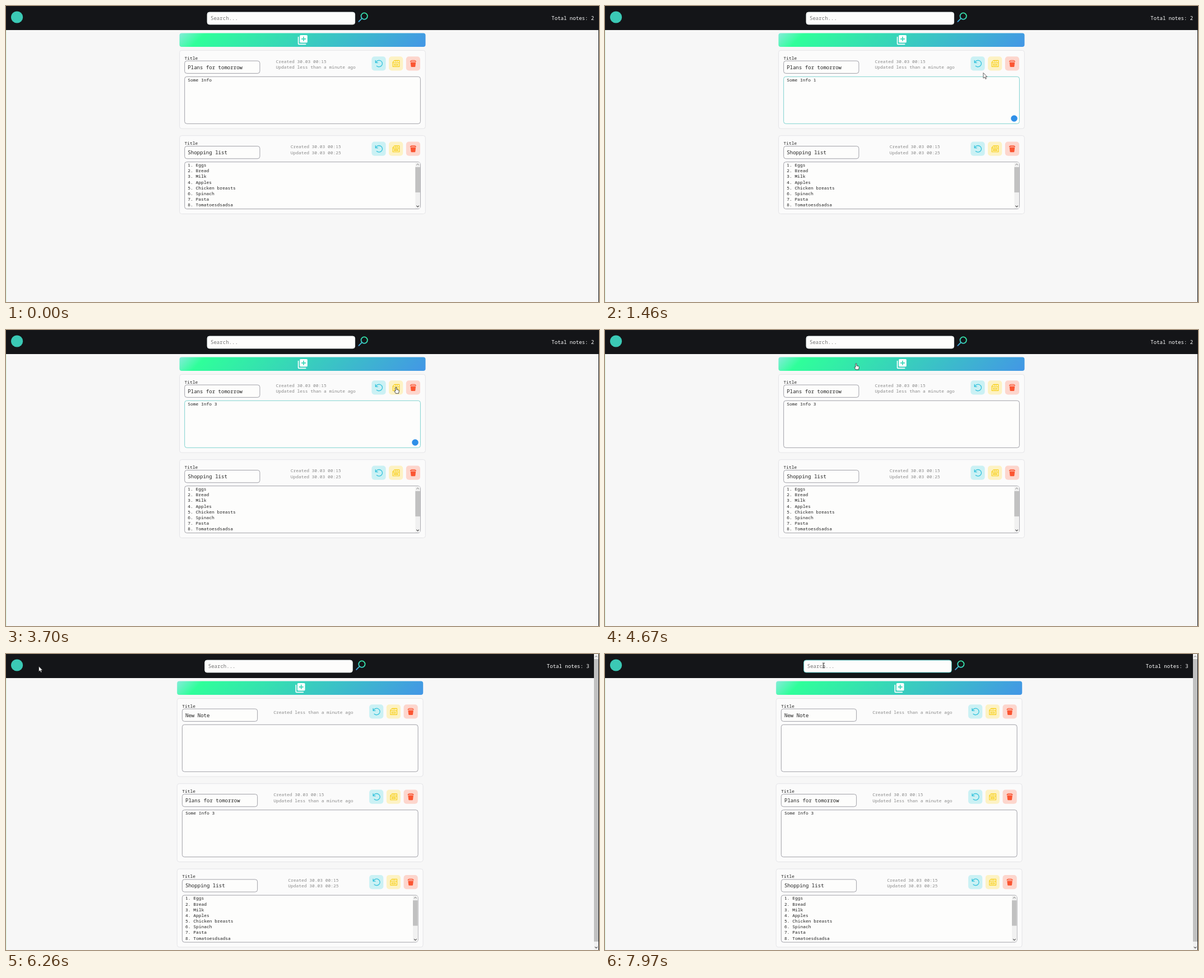
Write an HTML page that moves like this. It is 1058x529 px and loops after 8 s.

```html
<!DOCTYPE html>
<html lang="en">
<head>
<meta charset="utf-8">
<title>Notes</title>
<style>
html, body { margin: 0; width: 100%; height: 100%; overflow: hidden; background: #f7f7f7; }
svg { display: block; width: 1058px; height: 529px; }
text { font: 7.92px "Noto Sans Mono", "DejaVu Sans Mono", monospace; fill: #222; white-space: pre; }
.big { font-size: 9.06px; }
.meta { fill: #8b8b8b; }
.hint { fill: #757575; }
.field { fill: #fdfdfc; stroke: #92929a; stroke-width: .85; }
.focus { stroke: #6accc8; }
.search { stroke: #eef6f5; }
.search.focus { stroke: #45c9c6; }
.line { fill: none; stroke-linecap: round; stroke-linejoin: round; }
</style>
</head>
<body>
<svg id="stage" viewBox="0 0 1058 529">
  <defs>
    <linearGradient id="bar" gradientUnits="userSpaceOnUse" x1="413" y1="-55" x2="645" y2="177">
      <stop offset="0" stop-color="#84ecd9"/><stop offset=".1" stop-color="#2fff9a"/><stop offset="1" stop-color="#4396e6"/>
    </linearGradient>
    <linearGradient id="lens" gradientUnits="userSpaceOnUse" x1="644" y1="12" x2="629" y2="28">
      <stop offset="0" stop-color="#35f0a4"/><stop offset=".5" stop-color="#38d6bd"/><stop offset="1" stop-color="#4299e4"/>
    </linearGradient>
    <g id="tools">
      <rect x="652.4" y="90.2" width="25.2" height="25.2" rx="5" fill="#cbf1f4"/>
      <path class="line" d="M659.3 97.3v4h4M659.8 101a6 5.8 0 1 1 1.6 6.2" stroke="#35c3dc" stroke-width="1.3"/>
      <rect x="683.1" y="90.2" width="25.2" height="25.2" rx="5" fill="#fdf2c4"/>
      <path class="line" d="M690.2 100.4l3-3h8.6v10.9h-11.6zM690.4 101.5h11.2M692.8 104h6.2v2h-6.2zM695 97.6v2M698 97.6v2" stroke="#f8cf16" stroke-width="1.15"/>
      <rect x="713.8" y="90.2" width="25.2" height="25.2" rx="5" fill="#fdd6cd"/>
      <path d="M721.7 100.7h9.4l-.8 7.2q-.1 1-1.1 1h-5.6q-1 0-1.1-1z" fill="#fb5532"/>
      <path class="line" d="M721.4 99.2q.8-1.7 2.6-2h4.8q1.8.3 2.6 2z" stroke="#fb5532" stroke-width="1.1"/>
    </g>
    <g id="arrow"><path d="M0 0V9.6L2.3 7.5 3.9 11 5.4 10.3 3.9 7H6.8Z" fill="#fff" stroke="#222" stroke-width=".7"/></g>
    <g id="beam"><path class="line" d="M-1.8-4.2H1.8M0-4.2V4.2M-1.8 4.2H1.8" stroke="#333" stroke-width=".9"/></g>
    <g id="hand"><path d="M-1 .8Q0-.6 1 .8V4.5L4.4 5.2Q5.4 5.6 5.3 7L4.6 11.3H-.7L-3.1 7.2Q-2.8 5.8-1 7.2Z" fill="#fff" stroke="#222" stroke-width=".8"/></g>
  </defs>
  <rect width="1058" height="529" fill="#f7f7f7"/>
  <rect y="43" width="1" height="486" fill="#d9f6df"/>
  <rect width="1058" height="43" fill="#141518"/>
  <circle cx="19.6" cy="20" r="10.6" fill="#3bc9b5"/>
  <g id="before"></g>
  <g id="after"></g>
  <rect x="1057" width="1" height="529" fill="#141518"/>
  <path id="caret" d="M0 0V10" stroke="#111" stroke-width=".9"/>
  <use id="cursor"/>
</svg>
<script>
const $ = id => document.getElementById(id);
const text = (x, y, s, cls = '', more = '') => `<text x="${x}" y="${y}" class="${cls}" ${more}>${s}</text>`;
const box = (x, y, w, h, cls = '') => `<rect x="${x}" y="${y}" width="${w}" height="${h}" rx="4" class="field ${cls}"/>`;
const bare = (x, y, w, h, fill) => `<rect x="${x}" y="${y}" width="${w}" height="${h}" fill="${fill}"/>`;
const chevron = (x, y, dir, color) =>
  `<path class="line" d="M${x - 2} ${y + dir}l2 ${-2 * dir}l2 ${2 * dir}" stroke="${color}" stroke-width="1.1"/>`;

const PITCH = 152.4, SHIFT = -4.3;
const recent = 'less than a minute ago';
const shopping = {
  title: 'Shopping list', meta: ['Created 30.03 00:15', 'Updated 30.03 00:25'], scroll: true,
  body: ['Eggs', 'Bread', 'Milk', 'Apples', 'Chicken breasts', 'Spinach', 'Pasta', 'Tomatoesdsadsa'].map((s, i) => `${i + 1}. ${s}`)
};
const plans = { title: 'Plans for tomorrow', meta: ['Created 30.03 00:15', 'Updated ' + recent], body: ['Some Info 3'] };
const fresh = { title: 'New Note', meta: ['Created ' + recent], body: [] };

function card({ title, meta, body, scroll }, i) {
  const width = Math.max(...meta.map(s => s.length)) * 4.75;
  const metaY = meta.length > 1 ? 102 : 107;
  return `<g transform="translate(0 ${i * PITCH})">
    <rect x="309.6" y="79.3" width="438.8" height="139.8" rx="4" fill="#fbfbfb" stroke="#e3e3e6" stroke-width=".9"/>
    ${text(318.5, 95.6, 'Title')}${box(318.7, 98.1, 134.2, 22.3)}${text(324.3, 112.7, title, 'big')}
    ${meta.map((s, k) => text(552.8 - width / 2, metaY + k * 10.15, s, 'meta')).join('')}
    <use href="#tools"/>
    ${box(318.7, 126.3, 420.7, 84)}
    ${body.map((s, k) => text(324.3, 134.7 + k * 10.16, s)).join('')}
    ${scroll ? bare(730.3, 127, 8.6, 82.6, '#f1f1f1') + bare(730.3, 135.5, 8.6, 45.3, '#c1c1c1')
      + chevron(734.6, 130.7, 1, '#a3a3a3') + chevron(734.6, 205.8, -1, '#505050') : ''}
  </g>`;
}

const page = notes => `
  ${box(359, 11, 263.6, 22, 'search')}${text(365, 24.8, 'Search...', 'big hint')}
  <g class="line" stroke="url(#lens)"><circle cx="639.2" cy="18.1" r="5.7" stroke-width="1.8"/><path d="M634.9 22.4L629.4 27.9" stroke-width="1.9"/></g>
  <rect x="309.5" y="48.4" width="439" height="24.6" rx="4" fill="url(#bar)"/>
  <rect x="524.2" y="52" width="13.6" height="13.6" rx="1.5" fill="#fff"/>
  <path d="M531 54.8v8M527 58.8h8" stroke="#3bd6b9" stroke-width="1.7"/>
  <path class="line" d="M521.6 55.5V67.3Q521.6 68.3 522.6 68.3H534.6" stroke="#fff" stroke-width="1.7"/>
  ${notes.map(card).join('')}`;
const total = (x, n) => text(x, 24.8, 'Total notes: ' + n, 'big', 'text-anchor="end" style="fill:#fff;font-weight:500"');

$('before').innerHTML = page([plans, shopping]) + total(1049.3, 2)
  + '<circle id="badge" cx="730" cy="201" r="5.8" fill="#2f8fe8"/>';
$('after').innerHTML = `<g transform="translate(${SHIFT} 0)">${page([fresh, plans, shopping])}</g>` + total(1040.8, 3)
  + bare(1049, 0, 8, 529, '#f1f1f1') + bare(1049, 9, 8, 505, '#c1c1c1')
  + chevron(1053, 4.5, 1, '#a3a3a3') + chevron(1053, 524.7, -1, '#505050');

const area = $('before').querySelectorAll('.field')[2];
const info = [...$('before').querySelectorAll('text')].find(e => e.textContent === 'Some Info 3');
const search = $('after').querySelector('.search');

// time, x, y of the pointer
const path = [
  [100, 640, 235], [420, 600, 171], [1200, 600, 171], [1460, 675, 119.5], [1620, 665, 102], [1950, 665, 102],
  [2350, 600.5, 171], [3250, 600.5, 171], [3650, 696, 102], [4100, 696, 102], [4600, 448, 59.5], [5020, 448, 59.5],
  [5430, 58.5, 22], [6450, 58.5, 22], [7100, 377.5, 18], [7380, 390, 20.5], [8000, 390, 20.5]
];
// time, note text, whether its field has focus
const edits = [
  [0, 'Some Info', 0], [480, 'Some Info', 1], [700, 'Some Info ', 1], [850, 'Some Info 1', 1], [1760, 'Some Info', 0],
  [2400, 'Some Info', 1], [2850, 'Some Info ', 1], [3000, 'Some Info 3', 1], [3800, 'Some Info 3', 0]
];
const ADDED = 5000, SEARCHED = 7400;

function pointer(t) {
  const i = path.findIndex(k => k[0] > t);
  if (i < 1) return path[0].slice(1);
  const [a, x, y] = path[i - 1], [b, u, v] = path[i];
  const p = (t - a) / (b - a), e = p * p * (3 - 2 * p);
  return [x + (u - x) * e, y + (v - y) * e];
}

function shape(x, y) {
  const within = (l, t, r, b) => x > l && x < r && y > t && y < b;
  if (within(318, 127, 740, 210) || within(355, 11, 622, 33)) return '#beam';
  if (within(309, 48, 748, 73) || within(652, 90, 678, 115) || within(683, 90, 708, 115)) return '#hand';
  return '#arrow';
}

const show = (el, on) => el.setAttribute('visibility', on ? 'visible' : 'hidden');
const place = (el, x, y) => el.setAttribute('transform', `translate(${x} ${y})`);

function draw() {
  const t = performance.now() % 8000, added = t >= ADDED, searching = t >= SEARCHED;
  const [since, note, focused] = edits.findLast(k => t >= k[0]);
  $('before').style.display = added ? 'none' : '';
  $('after').style.display = added ? '' : 'none';
  info.textContent = note;
  area.classList.toggle('focus', !!focused);
  show($('badge'), focused);
  search.classList.toggle('focus', searching);

  const idle = t - (searching ? SEARCHED : since);
  show($('caret'), (focused || searching) && idle % 1060 < 530);
  if (searching) place($('caret'), 360.8, 16.5);
  else place($('caret'), 324.6 + note.length * 4.752, 126.8);

  const [x, y] = pointer(t);
  const typing = (t > 700 && t < 1200) || (t > 2850 && t < 3250);
  show($('cursor'), t >= 100 && !typing);
  $('cursor').setAttribute('href', shape(x, y));
  place($('cursor'), x, y);
  requestAnimationFrame(draw);
}
draw();
</script>
</body>
</html>
```
